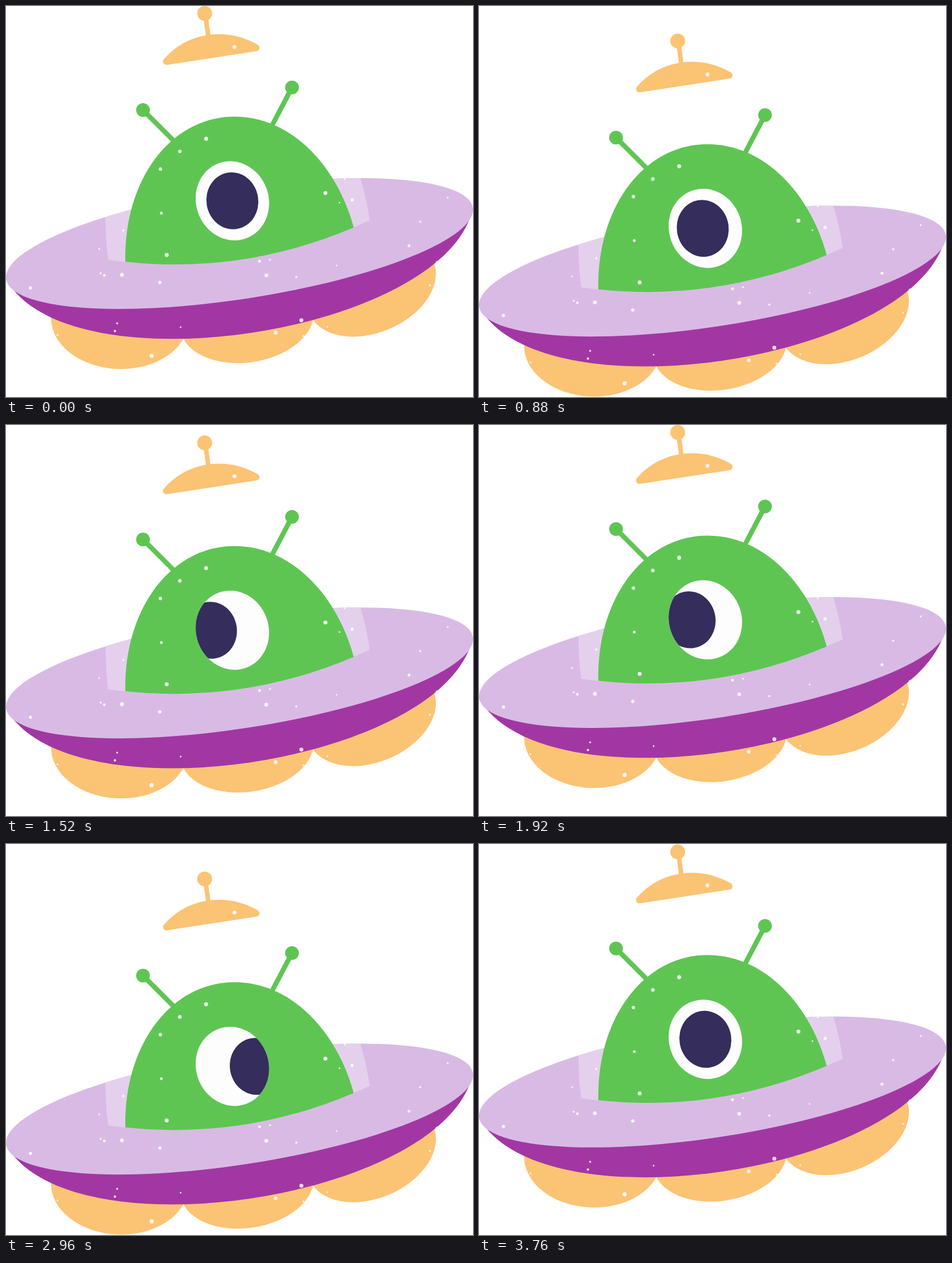
These frames come from a looping animation (818x684 px, 3840 ms). An HTML page:

```html
<!DOCTYPE html>
<html lang="en">
<head>
<meta charset="utf-8">
<title>Alien in a saucer</title>
<style>
  html, body { margin: 0; width: 100%; height: 100%; overflow: hidden; background: #fff; }
  svg { display: block; }
  .orange { fill: #fbc374; stroke: #fbc374; }
  .green { fill: #5ec553; stroke: #5ec553; }
  .flat { stroke: none; }
</style>
</head>
<body>
<svg width="818" height="684" viewBox="0 0 818 684">
  <defs>
    <ellipse id="rim" rx="413.5" ry="97" transform="translate(409 415.5) rotate(-8.7)"/>
    <clipPath id="rimClip"><use href="#rim"/></clipPath>
    <clipPath id="eyeClip"><ellipse class="eye" rx="63.6" ry="70"/></clipPath>
  </defs>
  <g id="ship">
    <g class="orange flat">
      <ellipse rx="120" ry="86.500" transform="translate(199 548.5) rotate(2)"/>
      <ellipse rx="118" ry="75" transform="translate(422 548.5) rotate(-8.7)"/>
      <ellipse rx="118" ry="79" transform="translate(640 492.5) rotate(-22.8)"/>
    </g>
    <path d="M-413.5 0C-335 210 335 210 413.5 0Z" fill="#a237a3" transform="translate(409 415.5) rotate(-8.7)"/>
    <use href="#rim" fill="#d9bae5"/>
    <path d="M174 355Q174 408 179 444Q415 478 637 375Q632 338 619 295Z" fill="#e4d0ec" clip-path="url(#rimClip)"/>

    <g class="green">
      <path d="M240 182L297 239M501 142.5L466 209" stroke-width="8.5"/>
      <circle class="flat" cx="240" cy="182" r="12"/>
      <circle class="flat" cx="501" cy="142.5" r="12"/>
      <path class="flat" d="M209 447.5C206 301 291 193.5 400 193.5C500 193.5 580 280 609 387.5Q414.6 469.8 209 447.5Z"/>
    </g>

    <g class="orange">
      <circle class="flat" cx="348" cy="13" r="13"/>
      <path d="M350 20L354.5 54" stroke-width="8"/>
      <path d="M281 97C318 55 380 41 438 73Z" stroke-width="12" stroke-linejoin="round"/>
    </g>

    <g id="specks" fill="#fff" fill-opacity=".85" stroke="#fff" stroke-opacity=".3"></g>

    <g transform="translate(396.5 340.8)">
      <ellipse class="eye" rx="63.6" ry="70" fill="#fdfdfd"/>
      <g clip-path="url(#eyeClip)">
        <ellipse id="pupil" rx="45.4" ry="49.9" fill="#352d5c"/>
      </g>
    </g>
  </g>
</svg>
<script>
const LOOP = 3840, STEP = 80, BOB = LOOP / 2;
const ship = document.getElementById('ship');
const pupil = document.getElementById('pupil');
const eyes = document.querySelectorAll('.eye');

let seed = 7;
const random = () => (seed = seed * 16807 % 2147483647) / 2147483647;

// White dust over the whole ship; it vanishes against the white background
const speck = () => `<circle cx="${818 * random()}" cy="${70 + 550 * random()}" r="${1.2 + 2.4 * random() ** 1.5}"/>`;
document.getElementById('specks').innerHTML = Array.from({ length: 65 }, speck).join('');

// Smoothstep from 0 to 1 between two times
function ease(t, from, to) {
  const u = Math.min(1, Math.max(0, (t - from) / (to - from)));
  return u * u * (3 - 2 * u);
}

function draw(now) {
  const t = Math.floor(now % LOOP / STEP) * STEP;
  const drop = 24.5 * (1 - Math.cos(2 * Math.PI * t / BOB));
  const gaze = -37.5 * ease(t, 740, 1380) + 78.5 * ease(t, 1720, 2620) - 41 * ease(t, 3020, 3620);
  const lid = 1 - 0.96 * (ease(t, 346, 520) - ease(t, 520, 694));

  ship.setAttribute('transform', `translate(0 ${drop})`);
  pupil.setAttribute('transform', `translate(${gaze} 0) rotate(-9)`);
  for (const eye of eyes)
    eye.setAttribute('transform', `rotate(-9) scale(1 ${lid}) rotate(-11)`);
}

const start = performance.now();
function tick() {
  draw(performance.now() - start);
  requestAnimationFrame(tick);
}
tick();
</script>
</body>
</html>
```
